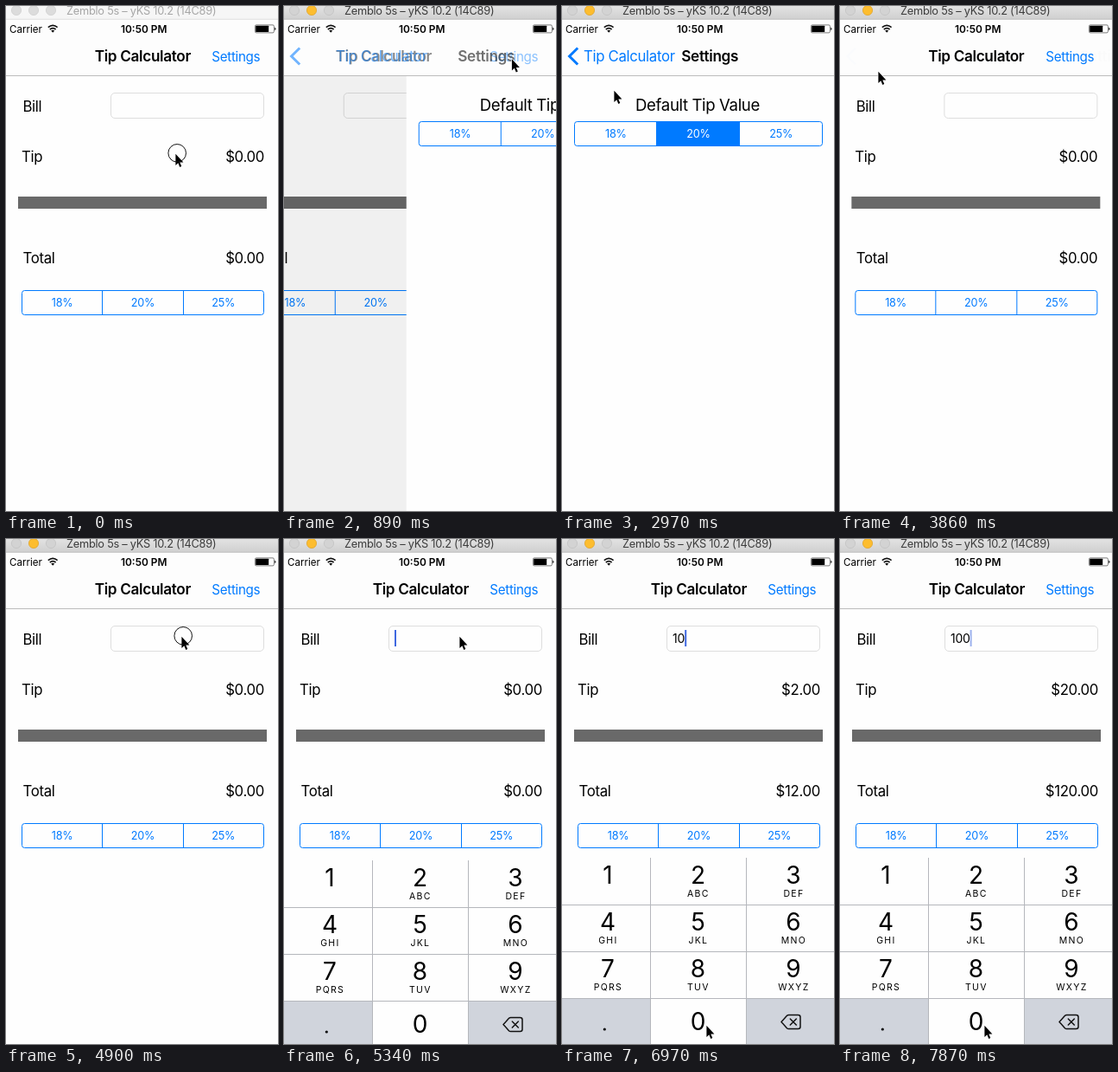
An HTML page that plays this animation: 315x583 px, repeating every 8 s.

```html
<!DOCTYPE html>
<html lang="en">
<head>
<meta charset="utf-8">
<title>Tip Calculator</title>
<style>
  html, body { margin: 0; width: 100%; height: 100%; overflow: hidden; background: #fefefe; }
  svg { display: block; width: 100%; height: 100%; }
  text { font-family: Inter, Roboto, sans-serif; font-size: 16.8px; letter-spacing: -.02em; white-space: pre; }
  .blue { fill: #007aff; }
  .bold { font-weight: 600; }
  .title { font-size: 17.2px; }
  .mid { text-anchor: middle; }
  .end { text-anchor: end; }
  .small { font-size: 12.7px; }
  .status { font-size: 11.9px; letter-spacing: 0; }
  .digit { font-size: 28px; letter-spacing: 0; }
  .letters { font-size: 10.5px; letter-spacing: 1.3px; }
</style>
</head>
<body>
<svg id="stage" viewBox="0 0 315 583" xmlns="http://www.w3.org/2000/svg"></svg>
<script>
const LOOP = 8000, STEP = 148.4, WIDTH = 315, KEYBOARD_TOP = 368;

// Each row: step, then the value(s) from that step on.
const CURSOR = [
  [0, 196, 170], [1, 198, 166], [3, 253, 74], [4, 265, 60], [8, 262, 61], [9, 222, 84],
  [10, 178, 110], [12, 193, 152], [15, 193, 152], [17, 152, 131], [20, 60, 97],
  [22, 44, 75], [26, 44, 75], [27, 90, 86], [29, 203, 112], [36, 203, 112],
  [37, 194, 132], [39, 108, 322], [40, 76, 380], [41, 72, 388], [42, 72, 388],
  [43, 92, 440], [45, 167, 561], [54, 167, 561]
];
const RING = [[0, 1], [1, 0], [4, 1], [6, 0], [13, 1], [14, 0], [22, 1], [24, 0],
  [33, 1], [35, 0], [41, 1], [43, 0], [46, 1], [47, 0], [48, 1], [49, 0]];
const PUSH = [[0, 0], [6, .55], [7, .91], [8, .99], [9, 1], [24, .45], [25, .08], [26, .007], [27, 0]];
const KEYBOARD = [[0, 215], [34, 140], [35, 32], [36, 3], [37, 0]];
const BILL = [[0, ''], [42, '1'], [47, '10'], [49, '100']];
const PRESSED = [[0, ''], [41, '1'], [43, ''], [46, '0'], [47, ''], [48, '0'], [49, '']];
const CARET = [[0, 0], [34, 1], [53, .5]];
const CARET_X = [128, 133.4, 142.2, 150.6];

const held = (rows, step) => rows.findLast(row => row[0] <= step)[1];

function tween(rows, step) {
  const i = rows.findLastIndex(row => row[0] <= step);
  const a = rows[i], b = rows[i + 1] || a;
  const k = (step - a[0]) / (b[0] - a[0] || 1);
  return [a[1] + (b[1] - a[1]) * k, a[2] + (b[2] - a[2]) * k];
}

const text = (x, y, cls, str, id = '') =>
  `<text x="${x}" y="${y}" class="${cls}" ${id && `id="${id}"`}>${str}</text>`;
const rect = (x, y, w, h, fill, more = '') =>
  `<rect x="${x}" y="${y}" width="${w}" height="${h}" fill="${fill}" ${more}/>`;

function segments(x, y, width, dividers, prefix) {
  const [left, right] = dividers;
  const cells = ['18%', '20%', '25%'].map((label, i) =>
    text(x + width * (i + .5) / 3, y + 18.7, 'mid small blue', label, `${prefix}${i}`)).join('');
  return rect(left, y, right - left, 28, '#007aff', `id="${prefix}Fill" opacity="0"`) +
    rect(x, y, width, 28, 'none', 'rx="3" stroke="#007aff"') +
    `<path d="M${left} ${y}v28M${right} ${y}v28" stroke="#007aff"/>` + cells;
}

function keyboard() {
  const names = ['', 'ABC', 'DEF', 'GHI', 'JKL', 'MNO', 'PQRS', 'TUV', 'WXYZ'];
  const edges = [0, 103, 214, 315], centers = [53, 157.5, 268];
  let out = rect(0, 368, 315, 230, '#fefefe');
  for (let i = 0; i < 11; i++) {
    const col = i % 3, row = Math.floor(i / 3), y = KEYBOARD_TOP + row * 54;
    const label = i < 9 ? i + 1 : 0;
    if (i === 9) continue;
    out += rect(edges[col], y, edges[col + 1] - edges[col], 54, '#fefefe', `id="key${label}"`);
    out += text(centers[col], y + (row < 3 ? 30 : 37.2), 'mid digit', label);
    if (names[i]) out += text(centers[col] + .4, y + 44.8, 'mid letters', names[i]);
  }
  return out +
    rect(0, 530, 103, 68, '#d0d4dc') + rect(214, 530, 101, 68, '#d0d4dc') +
    '<circle cx="49.3" cy="566" r="1.6"/>' +
    '<path d="M0 422.5H315M0 476.5H315M0 530.5H315M102.5 368V583M213.5 368V583" stroke="#b5b7bc"/>' +
    '<g fill="none" stroke="#111" stroke-width="1.5" stroke-linejoin="round" stroke-linecap="round">' +
    '<path d="M254 557.5l6.5-7.2q.8-.8 2-.8h11q2.5 0 2.5 2.5v11q0 2.5-2.5 2.5h-11q-1.2 0-2-.8z"/>' +
    '<path d="M264.3 554l7 7m0-7l-7 7"/></g>';
}

const lights = [12, 32, 52].map((x, i) =>
  `<circle id="light${i}" cx="${x}" cy="5" r="5.6" stroke-width=".8"/>`).join('');

document.getElementById('stage').innerHTML = `
  <defs><linearGradient id="chrome" x2="0" y2="1">
    <stop stop-color="#e2e2e2"/><stop offset="1" stop-color="#d0d0d0"/>
  </linearGradient></defs>
  ${rect(0, 0, 315, 583, '#fefefe')}
  <g id="main">
    ${text(19.4, 121.6, '', 'Bill')}
    ${rect(121.5, 100.5, 177, 29, '#fefefe', 'rx="4.5" stroke="#dedede"')}
    <text id="bill" x="128" y="119.6" style="font-size:14px"></text>
    ${rect(128, 105, 2, 19, '#3f68e0', 'id="caret"')}
    ${text(18, 179.5, '', 'Tip')}${text(299, 179.5, 'end', '', 'tip')}
    ${rect(14, 220, 288, 14, '#696969')}
    ${text(19.5, 296.8, '', 'Total')}${text(299, 296.8, 'end', '', 'total')}
    ${segments(18.5, 328.5, 280, [111.5, 205.5], 'main')}
  </g>
  ${rect(0, 80, 315, 503, '#000', 'id="shade"')}
  <g id="settings">
    ${rect(0, 80, 315, 503, '#fefefe')}
    <text x="157" y="121" class="mid" style="font-size:18.6px">Default Tip Value</text>
    ${segments(14.5, 133.5, 287, [109.5, 205.5], 'pref')}
  </g>
  <g id="keyboard">${keyboard()}</g>
  ${rect(0, 15, 315, 65, '#fdfdfd')}
  <path d="M0 80.5H315" stroke="#bcbcbc"/>
  ${text(158.3, 64, 'mid bold title', 'Tip Calculator', 'mainTitle')}
  <text id="open" x="266.3" y="63.5" class="mid blue" style="font-size:15.2px">Settings</text>
  <g id="back">
    <path d="M18.2 48.5L8.6 58l9.6 9.5" fill="none" stroke="#007aff" stroke-width="3"/>
    ${text(25, 64, 'blue', 'Tip Calculator', 'backLabel')}
  </g>
  ${text(171.2, 64, 'mid bold title', 'Settings', 'prefTitle')}
  <text x="4" y="30.6" class="status" style="font-size:11.6px">Carrier</text>
  ${text(159.7, 30.6, 'mid status bold', '10:50 PM')}
  <g fill="none" stroke="#111" stroke-width="1.7">
    <path d="M48.8 24.6q5.4-4.6 10.8 0M50.8 27q3.4-2.8 6.8 0"/>
    <path d="M54.2 30.8l-2-2.3q2-1.5 4 0z" fill="#111" stroke="none"/>
  </g>
  ${rect(288.4, 21.9, 22, 9, 'none', 'rx="1.5" stroke="#444" stroke-width=".7"')}
  ${rect(289.2, 22.7, 15, 7.4, '#000', 'rx=".6"')}
  <path d="M311.2 24.8q1.3.2 1.3 1.6t-1.3 1.6z" fill="#222"/>
  ${rect(0, 0, 315, 15, '', 'id="bar"')}
  <path id="barEdge" d="M0 15.3H315" stroke="#b2b2b2" stroke-width=".8"/>
  ${lights}
  <text id="windowTitle" x="70" y="9.5" style="font-size:12.8px">Zemblo 5s – yKS 10.2 (14C89)</text>
  <g id="cursor">
    <path d="M.4 .8V14L3.3 11.3 5.3 15.9 7.3 15 5.3 10.6H9.4Z" fill="#000" stroke="#fff" stroke-width="1.4" paint-order="stroke"/>
    <circle id="ring" cx="2.2" cy="-.2" r="10.3" fill="none" stroke="#111"/>
  </g>`;

const $ = id => document.getElementById(id);
const set = (id, attrs) => { for (const name in attrs) $(id).setAttribute(name, attrs[name]); };
const move = (id, x, y) => set(id, { transform: `translate(${x} ${y})` });

function drawWindow(active) {
  set('bar', { fill: active ? 'url(#chrome)' : '#f6f6f6' });
  set('barEdge', { stroke: active ? '#b2b2b2' : '#d8d8d8' });
  set('windowTitle', { fill: active ? '#3c3c3c' : '#a6a6a6' });
  for (let i = 0; i < 3; i++) {
    const yellow = active && i === 1;
    set(`light${i}`, {
      fill: yellow ? '#fdbd2f' : active ? '#d3d3d3' : '#dcdcdc',
      stroke: yellow ? '#e0a52c' : active ? '#c3c3c3' : '#d0d0d0'
    });
  }
}

function drawNavigation(step) {
  const p = held(PUSH, step), rest = 1 - p;
  move('main', -95 * p, 0);
  move('settings', WIDTH * rest, 0);
  set('shade', { opacity: .1 * p });
  move('mainTitle', -78 * p, 0);
  set('mainTitle', { opacity: rest });
  set('open', { opacity: rest * (step === 5 ? .3 : 1) });
  move('backLabel', 78 * rest, 0);
  set('back', { opacity: p * (step === 23 ? .3 : 1) });
  move('prefTitle', 140 * rest, 0);
  set('prefTitle', { opacity: p });

  const chosen = step >= 14;
  set('prefFill', { opacity: chosen ? 1 : step === 13 ? .15 : 0 });
  $('pref1').style.fill = chosen ? '#fff' : '';
}

function drawBill(step) {
  const bill = held(BILL, step), tip = bill * .2;
  $('bill').textContent = bill;
  $('tip').textContent = '$' + tip.toFixed(2);
  $('total').textContent = '$' + (Number(bill) + tip).toFixed(2);
  set('caret', { x: CARET_X[bill.length], opacity: held(CARET, step) });
  move('keyboard', 0, held(KEYBOARD, step));
  for (const key of ['0', '1'])
    set('key' + key, { fill: held(PRESSED, step) === key ? '#d0d4dc' : '#fefefe' });
}

function draw(time) {
  const step = Math.min(53, Math.floor((time + 4) / STEP));
  drawWindow(step > 0);
  drawNavigation(step);
  drawBill(step);
  move('cursor', ...tween(CURSOR, step));
  set('ring', { opacity: held(RING, step) });
}

const start = performance.now();
function tick() {
  draw((performance.now() - start) % LOOP);
  requestAnimationFrame(tick);
}
tick();
</script>
</body>
</html>
```
